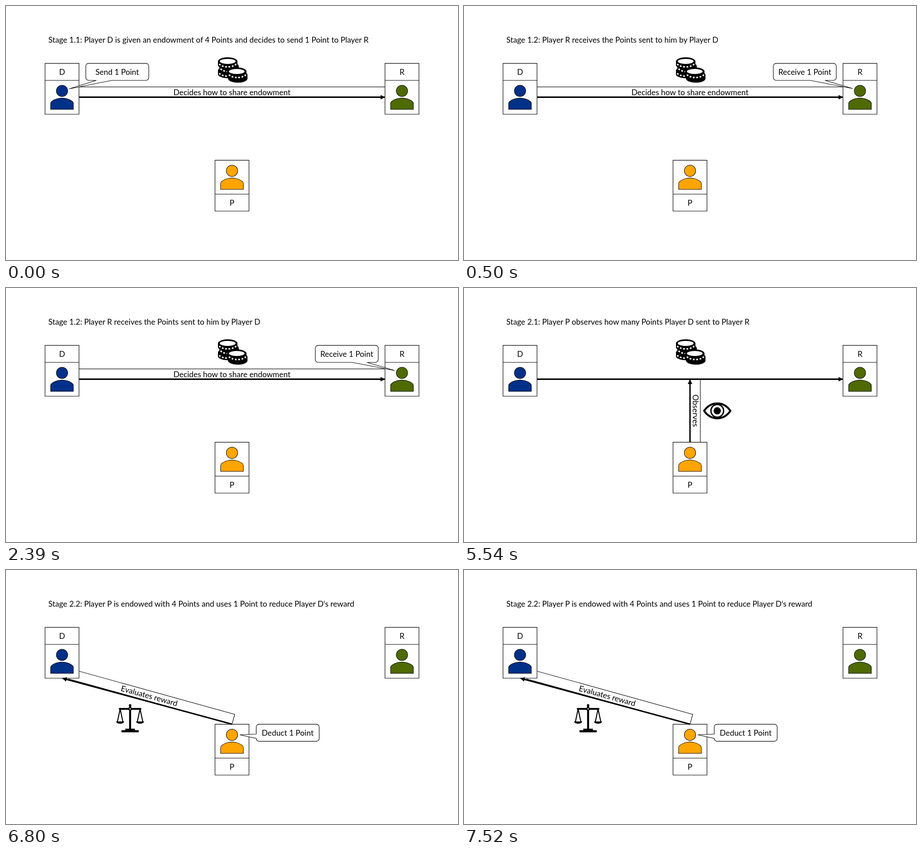
Recreate the animation shown at these times as an HTML page. Size 998x561 px, loop 8 s.

```html
<!DOCTYPE html>
<html lang="en">
<head>
<meta charset="utf-8">
<title>Three-player game</title>
<style>
  html, body { margin: 0; width: 100%; height: 100%; overflow: hidden; background: #fff; }
  svg { display: block; width: 100vw; height: 100vh; }
  text { font: 17.27px Lato, sans-serif; fill: #000; }
  .mid { text-anchor: middle; }
  .box { fill: #fff; stroke: #000; stroke-width: 1.15; }
  .person { stroke: #000; stroke-width: 1.3; }
  .arrow { stroke: #000; stroke-width: 3.1; }
  .scene { visibility: hidden; animation: 8s step-end infinite; }
  .s1 { animation-name: s1; }
  .s2 { animation-name: s2; }
  .s3 { animation-name: s3; }
  .s4 { animation-name: s4; }
  .s12 { animation-name: s12; }
  .s123 { animation-name: s123; }
  @keyframes s1 { 0% { visibility: visible } 6.25%, 100% { visibility: hidden } }
  @keyframes s2 { 0% { visibility: hidden } 6.25% { visibility: visible } 45.625%, 100% { visibility: hidden } }
  @keyframes s3 { 0% { visibility: hidden } 45.625% { visibility: visible } 85%, 100% { visibility: hidden } }
  @keyframes s4 { 0% { visibility: hidden } 85%, 100% { visibility: visible } }
  @keyframes s12 { 0% { visibility: visible } 45.625%, 100% { visibility: hidden } }
  @keyframes s123 { 0% { visibility: visible } 85%, 100% { visibility: hidden } }
</style>
</head>
<body>
<svg viewBox="0 0 998 561" preserveAspectRatio="none">
  <defs>
    <marker id="head" markerUnits="userSpaceOnUse" markerWidth="10" markerHeight="10" refX="9" refY="5" orient="auto">
      <path d="M0 0L10 5L0 10Z"/>
    </marker>
    <g id="person" class="person" transform="scale(.785)">
      <circle cy="-20" r="16"/>
      <path d="M32 32V16c0-2.4-1.2-4.8-3.2-6.4C24.4 6 19 3.4 13.6 2C9.6.8 4.8 0 0 0S-9.2.8-13.6 2C-19 3.4-24.4 6-28.8 9.6C-30.8 11.2-32 13.6-32 16V32Z"/>
    </g>
    <path id="coin" d="M-21.5 0A21.5 9 0 0 1 21.5 0V8A21.5 9 0 0 1 -21.5 8Z"/>
    <path id="ridge" d="M-18.5 0C-14 8.5 14 8.5 18.5 0" pathLength="11" fill="none" stroke="#fff" stroke-width="3.2" stroke-dasharray="1 1"/>
    <ellipse id="face" rx="17.3" ry="5.6" fill="#fff"/>
  </defs>

  <!-- labels beside the arrows -->
  <g class="scene s12">
    <rect class="box" x="150" y="178.7" width="698" height="22.6"/>
    <text class="mid" x="499" y="196.5">Decides how to share endowment</text>
  </g>
  <g class="scene s3">
    <rect class="box" x="499" y="201.5" width="22.8" height="150"/>
    <text class="mid" transform="translate(505 271) rotate(90)">Observes</text>
  </g>
  <g class="scene s4" transform="translate(499 340.5) rotate(15.5)">
    <rect class="box" x="-374" y="-22.5" width="374" height="22.5"/>
    <text class="mid" x="-192.8" y="-5.3">Evaluates reward</text>
  </g>

  <!-- players -->
  <g id="d">
    <path class="box" d="M86.2 126.6H161.2V239H86.2ZM86.2 164.2H161.2"/>
    <text class="mid" x="123.7" y="152">D</text>
    <use href="#person" x="123.7" y="203.2" fill="#003087"/>
  </g>
  <g id="r">
    <path class="box" d="M836.8 126.6H911.8V239H836.8ZM836.8 164.2H911.8"/>
    <text class="mid" x="874.3" y="152">R</text>
    <use href="#person" x="874.3" y="203.2" fill="#4e6a00"/>
  </g>
  <g id="p">
    <path class="box" d="M461.5 340.6H536.5V453H461.5ZM461.5 415.5H536.5"/>
    <text class="mid" x="499" y="441">P</text>
    <use href="#person" x="499" y="379.8" fill="#ffa500"/>
  </g>

  <!-- arrows and symbols -->
  <g class="scene s123">
    <path class="arrow" d="M161.5 201.4H836" marker-end="url(#head)"/>
    <use href="#coin" x="489.5" y="142.5"/>
    <use href="#ridge" x="489.5" y="148.5"/>
    <use href="#coin" x="492.5" y="133"/>
    <use href="#ridge" x="492.5" y="138.5"/>
    <use href="#coin" x="489.5" y="122.3"/>
    <use href="#ridge" x="489.5" y="128"/>
    <use href="#face" x="489.5" y="122.3"/>
    <use href="#coin" x="511.7" y="152.3"/>
    <use href="#coin" x="509.5" y="144.6"/>
    <use href="#ridge" x="511" y="151.5"/>
    <use href="#face" x="509.5" y="144.6"/>
  </g>
  <g class="scene s3">
    <path class="arrow" d="M499 340.5V203" marker-end="url(#head)"/>
    <g transform="translate(559.2 271.3)" fill="none" stroke="#000">
      <path d="M-29 0C-14 -22 14 -22 29 0C14 22 -14 22 -29 0Z" stroke-width="4.2" stroke-linejoin="round"/>
      <circle r="14" stroke-width="3"/>
      <circle r="8" fill="#000" stroke="none"/>
    </g>
  </g>
  <g class="scene s4">
    <path class="arrow" d="M499 340.5L125 239.2" marker-end="url(#head)"/>
    <g transform="translate(274 296)">
      <circle cy="3" r="2.8"/>
      <path d="M-2.2 3H2.2V54.5H10.5V57.8H19V62.5H-19V57.8H-10.5V54.5H-2.2Z"/>
      <path d="M-23 10.8H23" stroke="#000" stroke-width="4" stroke-linecap="round"/>
      <circle cy="10.8" r="4"/>
      <circle cy="10.8" r="1.4" fill="#fff"/>
      <path d="M-28 39L-22 11L-16 39M28 39L22 11L16 39" fill="none" stroke="#000" stroke-width="2.2"/>
      <path d="M-31.3 38.5H-12.7Q-15 43.5 -22 43.5T-31.3 38.5ZM31.3 38.5H12.7Q15 43.5 22 43.5T31.3 38.5Z"/>
    </g>
  </g>

  <!-- captions and speech bubbles -->
  <g class="scene s1">
    <text x="93.5" y="81">Stage 1.1: Player D is given an endowment of 4 Points and decides to send 1 Point to Player R</text>
    <path class="box" d="M182.5 126.6H308.9a6.3 6.3 0 0 1 6.3 6.3V157.9a6.3 6.3 0 0 1 -6.3 6.3H234L139.5 183L199.5 164.2H182.5a6.3 6.3 0 0 1 -6.3 -6.3V132.9a6.3 6.3 0 0 1 6.3 -6.3Z"/>
    <text class="mid" x="245.5" y="152">Send 1 Point</text>
  </g>
  <g class="scene s2">
    <text x="93.5" y="81">Stage 1.2: Player R receives the Points sent to him by Player D</text>
    <path class="box" d="M689.3 126.6H815.6a6.3 6.3 0 0 1 6.3 6.3V157.9a6.3 6.3 0 0 1 -6.3 6.3H797L858 182.3L764 164.2H689.3a6.3 6.3 0 0 1 -6.3 -6.3V132.9a6.3 6.3 0 0 1 6.3 -6.3Z"/>
    <text class="mid" x="752.5" y="152">Receive 1 Point</text>
  </g>
  <g class="scene s3">
    <text x="93.5" y="81">Stage 2.1: Player P observes how many Points Player D sent to Player R</text>
  </g>
  <g class="scene s4">
    <text x="93.5" y="81">Stage 2.2: Player P is endowed with 4 Points and uses 1 Point to reduce Player D‘s reward</text>
    <path class="box" d="M558.8 340.6H685.2a6.3 6.3 0 0 1 6.3 6.3V372a6.3 6.3 0 0 1 -6.3 6.3H558.8a6.3 6.3 0 0 1 -6.3 -6.3L516 364L552.5 362.5V346.9a6.3 6.3 0 0 1 6.3 -6.3Z"/>
    <text class="mid" x="622" y="366">Deduct 1 Point</text>
  </g>
</svg>
</body>
</html>
```
